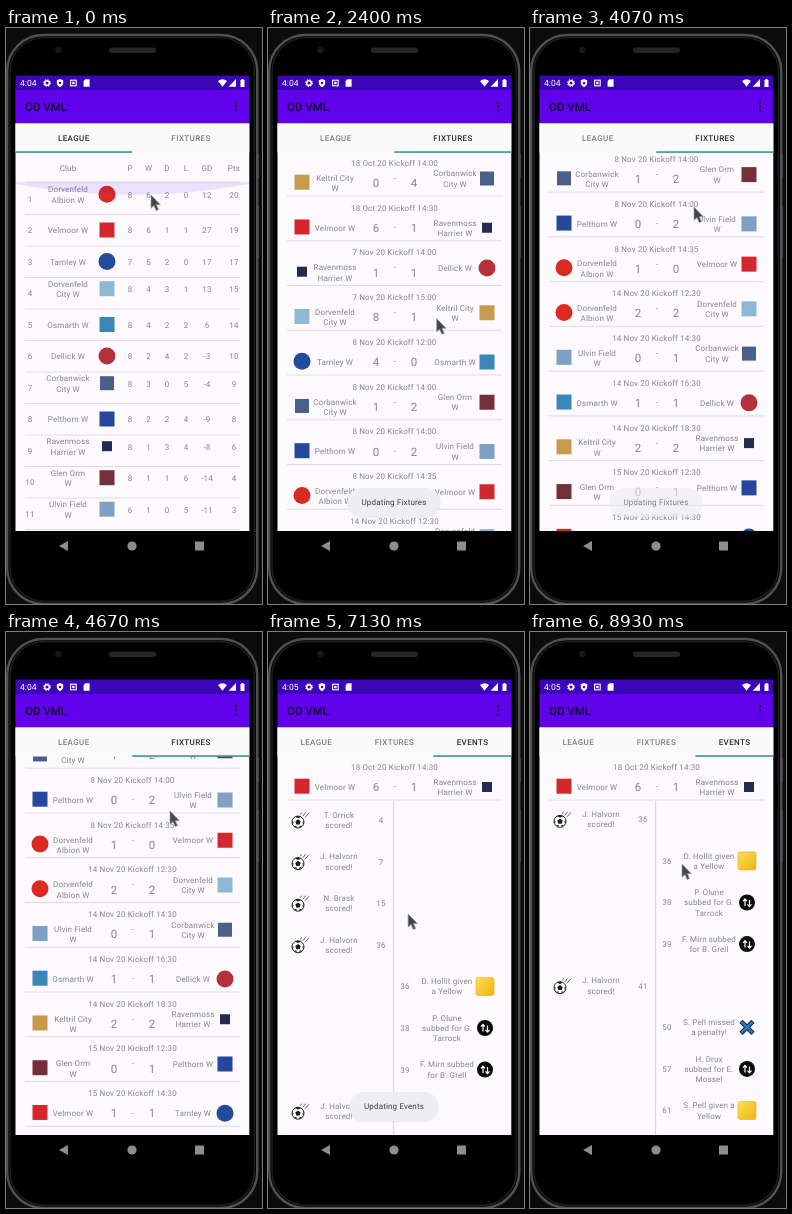
An HTML page that plays this animation: 256x576 px, repeating every 8.99 s.

```html
<!DOCTYPE html>
<html lang="en">
<head>
<meta charset="utf-8">
<title>League app</title>
<style>
html, body { margin: 0; width: 100%; height: 100%; overflow: hidden; background: #0c0c0d; }
svg { display: block; width: 256px; height: 576px; }
text { font-family: Roboto, "Open Sans", sans-serif; font-size: 8px; letter-spacing: .15px; fill: #858486; text-anchor: middle; text-rendering: geometricPrecision; }
.tab { font-weight: 500; letter-spacing: .4px; }
.score { font-size: 11.5px; letter-spacing: 0; }
.title { font-size: 11.5px; font-weight: 500; letter-spacing: 0; fill: #14032f; text-anchor: start; }
.clock { font-size: 8.6px; letter-spacing: 0; fill: #fff; text-anchor: start; }
.note { fill: #3b3a3c; }
</style>
</head>
<body>
<svg id="stage" viewBox="0 0 256 576" xmlns="http://www.w3.org/2000/svg">
  <defs>
    <clipPath id="pageClip"><rect x="9.5" y="124" width="233.8" height="379"/></clipPath>
    <clipPath id="eventClip"><rect x="9.5" y="169" width="233.8" height="334"/></clipPath>
    <clipPath id="tabClip"><rect x="126" y="96" width="117.3" height="28.5"/></clipPath>
    <linearGradient id="gold" x2="1" y2="1"><stop stop-color="#ffdf57"/><stop offset="1" stop-color="#efb312"/></linearGradient>
  </defs>
  <rect width="256" height="576" fill="#0c0c0d"/>
  <path d="M251 126h2v24h-2zM251 178h2v52h-2z" fill="#3a3b3d"/>
  <rect x="1.2" y="7" width="250" height="569" rx="36" fill="#000" stroke="#505154" stroke-width="2.4"/>
  <rect x="4" y="9.800" width="244.400" height="563.400" rx="33.500" fill="none" stroke="#1c1d1f" stroke-width="1.600"/>
  <circle cx="52.500" cy="22" r="3.200" fill="#17181b"/>
  <rect x="103" y="19.500" width="47" height="5.500" rx="2.700" fill="#242527"/>

  <rect x="9.5" y="47.600" width="233.8" height="16" fill="#3d05b8"/>
  <rect x="9.5" y="62" width="233.8" height="34" fill="#6002ec"/>
  <text id="clock" class="clock" x="14" y="58">4:04</text>
  <g fill="#fff">
    <circle cx="41" cy="55" r="2.3" fill="none" stroke="#fff" stroke-width="1.6"/>
    <circle cx="41" cy="55" r="3.3" fill="none" stroke="#fff" stroke-width="1.1" stroke-dasharray="1.3 1.3"/>
    <path d="M54 51l3.2 1.2v2.6q0 3-3.2 4.4q-3.2-1.4-3.2-4.4v-2.6z"/>
    <circle cx="54" cy="55" r="1.2" fill="#3d05b8"/>
    <rect x="64.6" y="52.2" width="5.6" height="5.6" fill="none" stroke="#fff" stroke-width="1.1"/>
    <rect x="66.2" y="53.8" width="2.4" height="2.4"/>
    <path d="M79.4 51.2h4.2v7.6h-6v-5.8zM212 53q4.500-3.600 9 0l-4.500 5.700zM230 51v7.800h-7.400zM234.500 52h1v-1h2v1h1v7h-4z"/>
  </g>
  <text class="title" x="19" y="83">OD VML</text>
  <g fill="#17043a"><circle cx="230" cy="74.500" r="1.150"/><circle cx="230" cy="78.500" r="1.150"/><circle cx="230" cy="82.500" r="1.150"/></g>

  <rect x="9.5" y="95.500" width="233.8" height="408" fill="#fcfafd"/>
  <g clip-path="url(#pageClip)">
    <g id="league"></g>
    <g id="fixtures"></g>
    <g id="events"></g>
    <path id="topGlow" d="M9 124H243.500V126Q126 146 9 126z" fill="#6200ee"/>
  </g>
  <rect x="9.5" y="95.500" width="233.8" height="29" fill="#fbfafb"/>
  <circle id="tabRipple" cx="189" cy="111" fill="#000" clip-path="url(#tabClip)"/>
  <g id="tabs"></g>
  <rect id="bar" y="123.300" height="1.500" fill="#2f8f7d"/>
  <g id="toast">
    <rect id="toastShade" y="461" height="29.300" rx="14.600" fill="#000" opacity=".05"/>
    <rect id="toastBox" y="460" height="29" rx="14.500" fill="#eeedef"/>
    <text id="toastText" class="note" x="126" y="477.300"></text>
  </g>
  <rect x="9" y="503" width="235" height="28" fill="#000"/>
  <g fill="#8e8e90"><path d="M53 518l9-5v10z"/><circle cx="126" cy="518" r="4.600"/><rect x="189" y="513.500" width="9" height="9" rx=".6"/></g>
  <path id="cursor" d="M0 0v13.200l3-2.600 2.200 5 2.300-1-2.200-4.900h4z" fill="#464547" stroke="#9b999d" stroke-width=".7"/>
</svg>
<script>
const LOOP = 8990, PITCH = 44.75, EVENT_PITCH = 41.6, PAGE = 234.5;
const $ = id => document.getElementById(id);
const clamp = (v, a = 0, b = 1) => Math.min(b, Math.max(a, v));
const part = (t, a, b) => clamp((t - a) / (b - a));
const smooth = p => p * p * (3 - 2 * p);
const easeOut = p => 1 - (1 - p) * (1 - p);

// Each club: name lines, crest colour, crest shape (c circle, s square), crest size
const CLUBS = {
  alb: ['Dorvenfeld|Albion W', '#d92b20', 'c', 17],
  vel: ['Velmoor W', '#d3262d', 's', 15],
  tar: ['Tarnley W', '#224c9b', 'c', 17],
  hat: ['Dorvenfeld|City W', '#8db9d6', 's', 15],
  osm: ['Osmarth W', '#3a86b8', 's', 15],
  del: ['Dellick W', '#b5313c', 'c', 17],
  cor: ['Corbanwick|City W', '#4b6088', 's', 14],
  pel: ['Pelthorn W', '#27479c', 's', 15],
  rav: ['Ravenmoss|Harrier W', '#232b50', 's', 10],
  orm: ['Glen Orm|W', '#74303a', 's', 15],
  ulv: ['Ulvin Field|W', '#7f9fc4', 's', 15],
  kel: ['Keltril City|W', '#c59b4c', 's', 15]
};
const TABLE = `alb 8 6 2 0 12 20
vel 8 6 1 1 27 19
tar 7 5 2 0 17 17
hat 8 4 3 1 13 15
osm 8 4 2 2 6 14
del 8 2 4 2 -3 10
cor 8 3 0 5 -4 9
pel 8 2 2 4 -9 8
rav 8 1 3 4 -8 6
orm 8 1 1 6 -14 4
ulv 6 1 0 5 -11 3`;
const GAMES = `18 Oct,14:00,kel,0,4,cor
18 Oct,14:30,vel,6,1,rav
7 Nov,14:00,rav,1,1,del
7 Nov,15:00,hat,8,1,kel
8 Nov,12:00,tar,4,0,osm
8 Nov,14:00,cor,1,2,orm
8 Nov,14:00,pel,0,2,ulv
8 Nov,14:35,alb,1,0,vel
14 Nov,12:30,alb,2,2,hat
14 Nov,14:30,ulv,0,1,cor
14 Nov,16:30,osm,1,1,del
14 Nov,18:30,kel,2,2,rav
15 Nov,12:30,orm,0,1,pel
15 Nov,14:30,vel,1,1,tar`.split('\n');
const EVENTS = `4,goal,T. Orrick|scored!
7,goal,J. Halvorn|scored!
15,goal,N. Brask|scored!
36,goal,J. Halvorn|scored!
36,card,D. Hollit given|a Yellow
38,sub,P. Olune|subbed for G.|Tarrock
39,sub,F. Mirn subbed|for B. Grell
41,goal,J. Halvorn|scored!
50,miss,S. Pell missed|a penalty!
57,sub,H. Drux|subbed for E.|Mossel
61,card,S. Pell given a|Yellow`.split('\n');

const text = (x, y, s, cls = '') => `<text class="${cls}" x="${x}" y="${y + (cls === 'score' ? 4 : 2.9)}">${s}</text>`;
const lines = (x, y, s) => s.split('|').map((l, i, a) => text(x, y + (i - (a.length - 1) / 2) * 10.3, l)).join('');
const rule = y => `<path d="M19 ${y}H234" stroke="#dbd9dc" stroke-width=".9"/>`;
const isTall = id => CLUBS[id][0].includes('|');
function crest(x, y, id) {
  const [, fill, kind, d] = CLUBS[id];
  return kind === 'c'
    ? `<circle cx="${x}" cy="${y}" r="${d / 2}" fill="${fill}"/>`
    : `<rect x="${x - d / 2}" y="${y - d / 2}" width="${d}" height="${d}" fill="${fill}"/>`;
}

function leaguePage() {
  const cols = [124, 142.5, 161, 180, 201, 228];
  let s = text(62, 140, 'Club') + rule(154);
  'P W D L GD Pts'.split(' ').forEach((h, i) => s += text(cols[i], 140, h));
  TABLE.split('\n').forEach((row, i) => {
    const [id, ...nums] = row.split(' ');
    const base = 171 + 31.5 * i, y = base - (isTall(id) ? 4.3 : 0);
    s += text(24, base, i + 1) + lines(62, y, CLUBS[id][0]) + crest(101, y - .5, id);
    nums.forEach((n, k) => s += text(cols[k], y, n));
    s += rule(base + 15.5);
  });
  return s + '<path id="listGlow" d="M9 154H243.500V156Q126 178 9 156z" fill="#6200ee"/>';
}

function game(row, y) {
  const [day, time, home, a, b, away] = row.split(',');
  const mid = y + 20, right = isTall(home) ? y + 15.5 : mid;
  return text(126.5, y, `${day} 20 Kickoff ${time}`)
    + crest(34, mid - .8, home) + lines(67, mid, CLUBS[home][0])
    + text(108, mid, a, 'score') + text(127, right - .5, '-') + text(146, mid, b, 'score')
    + lines(187, right, CLUBS[away][0]) + crest(219, right, away) + rule(y + 33);
}

const ICONS = {
  goal: `<circle cx="-2" cy="2" r="6" fill="#fff" stroke="#222" stroke-width="1"/>
    <path d="M-2-.8l2.700 2-1 3.200h-3.400l-1-3.200zM-5-3l3-1 3 1-3 1.300zM-8 1l1.500 1-.5 3zM4 1l-1.500 1 .5 3zM-6 6l2.300-.5.500 2.200zM2 6l-2.300-.5-.5 2.200z" fill="#1c1c1c"/>
    <path d="M3-4l2.500-3.500M5-2.500l4-4.500M.5-5.500l1-2" stroke="#555" stroke-width=".9"/>`,
  card: '<rect x="-9" y="-9" width="18" height="18" rx="2" fill="url(#gold)" stroke="#e3ae25" stroke-width=".6"/>',
  sub: `<circle r="8" fill="#0b0b0c"/><path d="M-2 3.500v-7m-2 2.200l2-2.200 2 2.200M2.500-2.500v6.500m-2-2.200l2 2.200 2-2.200" fill="none" stroke="#fff" stroke-width="1.200"/>`,
  miss: '<path d="M-6-6L6 6M6-6L-6 6" stroke="#14243a" stroke-width="4.600"/><path d="M-5.500-5.500l11 11M5.500-5.500l-11 11" stroke="#2f78c4" stroke-width="2.600"/>'
};
function event(row, i) {
  const [min, kind, label] = row.split(','), y = 188 + EVENT_PITCH * i;
  const [iconX, nameX, minX] = kind === 'goal' ? [32, 71, 113] : [217, 179, 137];
  return `<g transform="translate(${iconX} ${y})">${ICONS[kind]}</g>` + lines(nameX, y, label) + text(minX, y, min);
}

$('league').innerHTML = leaguePage();
$('fixtures').innerHTML = '<g id="gameList"><rect id="rowRipple" x="9" y="169" width="234.500" height="44" fill="#000"/>'
  + GAMES.map((g, i) => game(g, 135 + PITCH * i)).join('') + '</g>';
$('events').innerHTML = game(GAMES[1], 135)
  + '<g id="eventBox" clip-path="url(#eventClip)"><path d="M125.500 169V504" stroke="#dddbde" stroke-width="1.300"/><g id="eventList">'
  + EVENTS.map(event).join('') + '</g><path id="eventGlow" d="M9 169H243.500Q126 178 9 169z" fill="#6200ee"/></g>';
$('tabs').innerHTML = ['LEAGUE', 'FIXTURES', 'EVENTS'].map(n => text(0, 110.2, n, 'tab')).join('');
const tabs = [...$('tabs').children];

// Pointer tip: time, x, y
const PATH = [
  [70, 145, 167], [730, 187, 113], [870, 187, 113], [1070, 189, 111], [1750, 189, 111],
  [2650, 164, 332], [2750, 164, 332], [3704, 164, 179], [4690, 164, 179], [5130, 160, 513],
  [5230, 160, 513], [5800, 121, 192], [6660, 121, 192], [7530, 155, 352], [7880, 155, 352], [8930, 152, 232]
];
function pointer(t) {
  const i = PATH.findIndex(k => k[0] > t);
  if (i === 0) return PATH[0].slice(1);
  if (i < 0) return PATH[PATH.length - 1].slice(1);
  const a = PATH[i - 1], b = PATH[i], p = smooth(part(t, a[0], b[0]));
  return [a[1] + (b[1] - a[1]) * p, a[2] + (b[2] - a[2]) * p];
}

const END = 255.5, FLING = 3500;
function gameScroll(t) {
  if (t < 2750) return 0;
  if (t < FLING) return 332 - pointer(t)[1];
  if (t < 4690) {
    const from = 332 - pointer(FLING)[1];
    return from + (END - from) * easeOut(part(t, FLING, 4600));
  }
  return t < 5230 ? Math.max(0, END - (pointer(t)[1] - 179)) : 0;
}

const set = (id, attrs) => { for (const k in attrs) $(id).setAttribute(k, attrs[k]); };
const shift = (id, x, y = 0) => set(id, { transform: `translate(${x} ${y})` });

function draw(t) {
  const [px, py] = pointer(t);
  shift('cursor', px, py);
  $('clock').textContent = t < 5200 ? '4:04' : '4:05';

  // Pages and tabs
  const page = smooth(part(t, 1640, 1960)) + smooth(part(t, 6140, 6460));
  ['league', 'fixtures', 'events'].forEach((id, i) => {
    shift(id, (i - page) * PAGE);
    set(id, { display: Math.abs(i - page) < 1 ? 'inline' : 'none' });
  });
  const count = t < 6130 ? 2 : 3, w = PAGE / count;
  const active = t < 1640 ? 0 : t < 6130 ? 1 : 2;
  tabs.forEach((el, i) => {
    el.setAttribute('x', 9.2 + w * (i + .5));
    el.setAttribute('display', i < count ? 'inline' : 'none');
    el.style.fill = i === active ? '#2a292b' : '#7d7c7f';
  });
  set('bar', { x: 9 + w * page, width: w });
  set('tabRipple', {
    r: 36 + 65 * part(t, 1530, 1760),
    opacity: t < 1525 ? 0 : .13 * (1 - part(t, 1700, 2050))
  });

  // Lists
  shift('gameList', 0, -gameScroll(t));
  set('rowRipple', { opacity: t < 6040 ? 0 : .07 * (1 - part(t, 6150, 6450)) });
  set('eventBox', { display: t < 6660 ? 'none' : 'inline' });
  shift('eventList', 0, -125.5 * smooth(part(t, 7880, 8930)));

  // Edge glows
  set('listGlow', { opacity: .1 * (1 - part(t, 30, 600)) });
  set('topGlow', { opacity: .1 * part(t, 4980, 5120) * (1 - part(t, 5180, 5600)) });
  set('eventGlow', { opacity: .05 * part(t, 7600, 7700) * (1 - part(t, 7840, 8050)) });

  // Toasts
  const late = t > 5500, start = late ? 6480 : 1980, half = late ? 44.5 : 46.5;
  $('toastText').textContent = late ? 'Updating Events' : 'Updating Fixtures';
  for (const id of ['toastBox', 'toastShade']) set(id, { x: 126 - half, width: half * 2 });
  set('toast', { opacity: part(t, start, start + 200) * (1 - part(t, start + 2000, start + 2250)) });
}

const begin = performance.now();
function tick() {
  draw((performance.now() - begin) % LOOP);
  requestAnimationFrame(tick);
}
tick();
</script>
</body>
</html>
```
